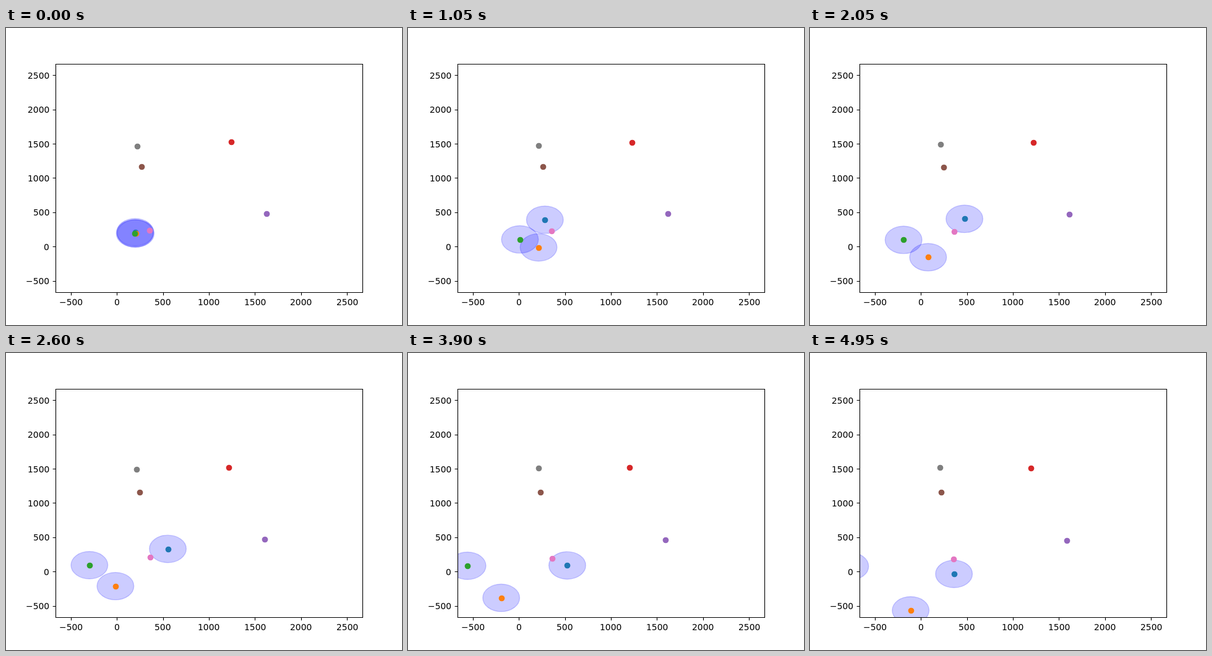
These frames come from a looping animation (640 px wide and 480 px high, 5000 ms). An HTML page:

```html
<!DOCTYPE html>
<html lang="en">
<head>
<meta charset="utf-8">
<title>Moving points</title>
<style>
  html, body { margin: 0; width: 100%; height: 100%; overflow: hidden; background: #fff; }
  svg { display: block; width: 640px; height: 480px; }
  text { font: 13.889px "DejaVu Sans", sans-serif; fill: #000; }
  .axis { fill: none; stroke: #000; stroke-width: 1.111; }
  .range { fill: #00f; fill-opacity: .2; stroke: #00f; stroke-opacity: .2; stroke-width: 1.389; }
</style>
</head>
<body>
<svg id="plot" viewBox="0 0 640 480">
  <clipPath id="area"><rect x="80" y="57.6" width="496" height="369.6"/></clipPath>
  <g id="ranges" clip-path="url(#area)"></g>
  <g id="dots" clip-path="url(#area)"></g>
  <g id="axes"></g>
</svg>
<script>
const LOOP = 5000, STEP = 50, COUNT = LOOP / STEP;
const SPEED = 10, HOME = 200, REACH = 200;
const SX = 0.1488, SY = 0.11088;
const px = x => 179.2 + x * SX;
const py = y => 353.28 - y * SY;
const snap = v => Math.floor(v + 0.5) + 0.5;
const $ = id => document.getElementById(id);

function add(parent, tag, attrs, text) {
  const el = document.createElementNS("http://www.w3.org/2000/svg", tag);
  for (const k in attrs) el.setAttribute(k, attrs[k]);
  if (text !== undefined) el.textContent = text;
  parent.appendChild(el);
  return el;
}

// Heading in degrees at a step, turning evenly between [step, heading] keys
function headingAt(keys, k) {
  let i = 0;
  while (i < keys.length - 2 && k >= keys[i + 1][0]) i++;
  const [a, from] = keys[i], [b, to] = keys[i + 1];
  return from + (to - from) * (k - a) / (b - a);
}

// Constant speed walk that follows the heading
function walk(keys) {
  const path = [];
  let x = HOME, y = HOME;
  for (let k = 0; k < COUNT; k++) {
    const angle = headingAt(keys, k) * Math.PI / 180;
    x += SPEED * Math.cos(angle);
    y += SPEED * Math.sin(angle);
    path.push([px(x), py(y)]);
  }
  return path;
}

const movers = [
  { color: "#1f77b4", path: walk([[0, 98], [72, -117], [99, -159]]) },
  { color: "#ff7f0e", path: walk([[0, -60], [30, -135], [59, -159], [99, -35]]) },
  { color: "#2ca02c", path: walk([[0, 234], [20, 182], [99, 182]]) }
];

// Slow drift in whole pixels
const drifters = [
  { color: "#d62728", at: k => [364.5 - 0.0755 * k, 184.9 + 0.0124 * k] },
  { color: "#9467bd", at: k => [421.8 - 0.0625 * k, 300 + 0.0304 * k] },
  { color: "#8c564b", at: k => [219.65 - 0.07 * k, 224.7 + 0.012 * k] },
  { color: "#e377c2", at: k => [233.38 - (k - 64) ** 2 / 3000, 327.3 + 0.0622 * k] },
  { color: "#7f7f7f", at: k => [212.15 - 0.0135 * k, 191.4 - 0.0606 * k] }
];

// Text whose left edge sits on a whole pixel; align is the share left of x
function label(text, x, y, align) {
  const el = add($("axes"), "text", { y: Math.round(y) }, text);
  el.setAttribute("x", Math.round(x - align * el.getComputedTextLength()));
}

function drawAxes() {
  let d = "M80.5 58.5H576.5V427.5H80.5Z";
  for (let v = -500; v <= 2500; v += 500) {
    const x = px(v), y = py(v), text = String(v).replace("-", "\u2212");
    d += `M${snap(x)} 427.5v4.86M80.5 ${snap(y)}h-4.86`;
    label(text, x, 448, 0.5);
    label(text, 70.28, y + 5.6, 1);
  }
  add($("axes"), "path", { d, class: "axis" });
}

function setup() {
  drawAxes();
  for (const p of movers) {
    p.range = add($("ranges"), "ellipse", { rx: REACH * SX, ry: REACH * SY, class: "range" });
  }
  for (const p of [...movers, ...drifters]) {
    p.dot = add($("dots"), "circle", { r: 4.86, fill: p.color });
  }
}

function place(el, x, y) {
  el.setAttribute("cx", x);
  el.setAttribute("cy", y);
}

function render(ms) {
  const k = Math.floor((ms % LOOP) / STEP);
  for (const p of movers) {
    const [x, y] = p.path[k];
    place(p.range, x, y);
    place(p.dot, snap(x), snap(y));
  }
  for (const p of drifters) {
    const [x, y] = p.at(k);
    place(p.dot, Math.floor(x) + 0.5, Math.floor(y) + 0.5);
  }
}

setup();
render(0);
const start = performance.now();
(function tick() {
  render(performance.now() - start);
  requestAnimationFrame(tick);
})();
</script>
</body>
</html>
```
